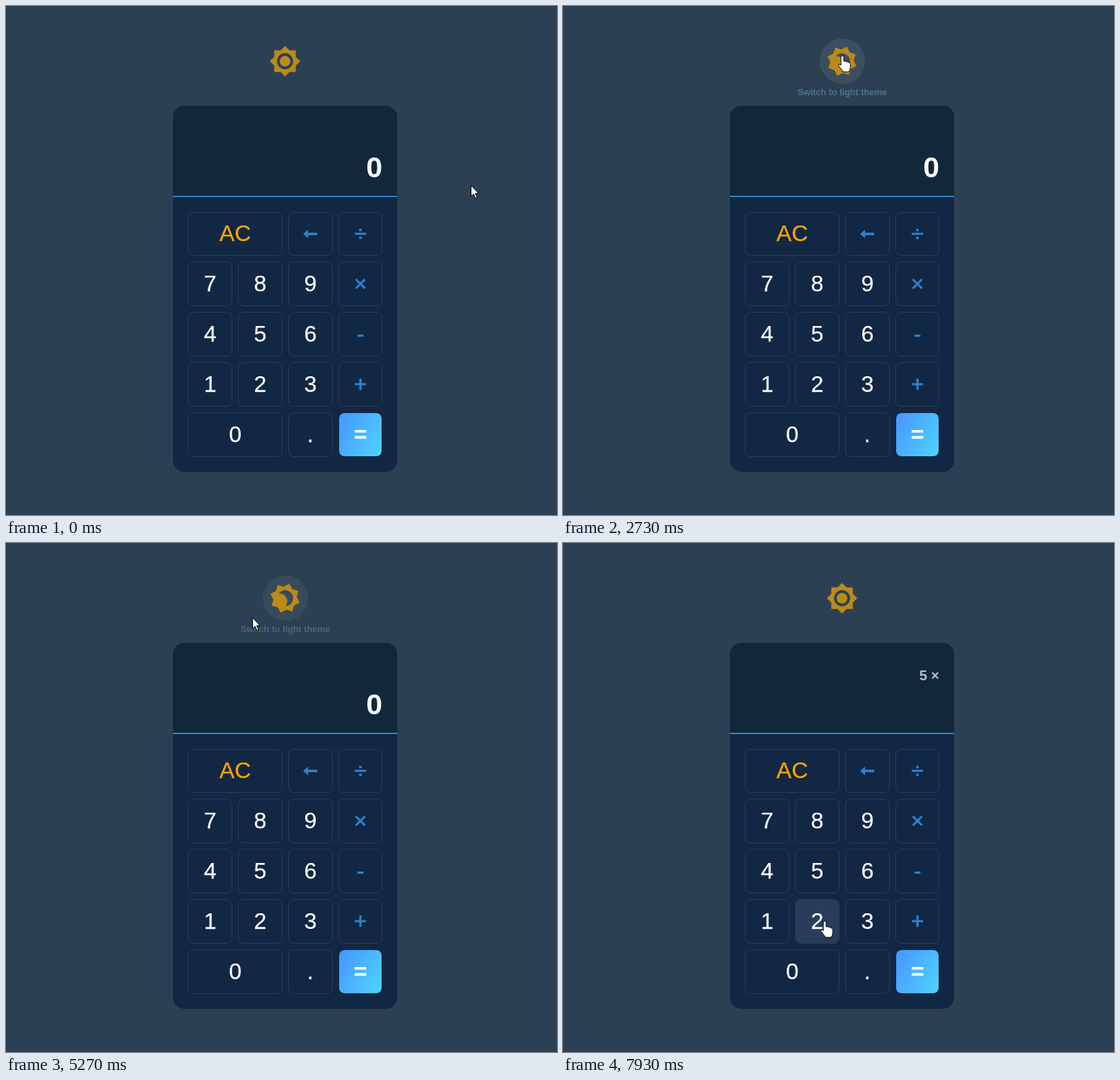
An HTML page that plays this animation: 779 by 719 pixels, repeating every 8 s.

```html
<!DOCTYPE html>
<html lang="en">
<head>
<meta charset="utf-8">
<title>Calculator theme switch</title>
<style>
html, body { margin: 0; width: 100%; height: 100%; overflow: hidden; }
#stage {
  --bg: #2c4054; --body: #112743; --screen: #11283b; --line: #3182ce;
  --edge: #2a3e52; --text: #fff; --halo: #3d4f5e; --icon: #bb8a18; --eq: #112743;
  position: relative; width: 779px; height: 719px; overflow: hidden;
  background: var(--bg); color: var(--text);
  font-family: "Liberation Sans", Arial, sans-serif;
}
#stage.light {
  --bg: #f0f0f0; --body: #fcffff; --line: #3a78c6;
  --screen: linear-gradient(120deg, #4dd8ff, #4794ff);
  --edge: #e6eef3; --text: #222; --halo: #d9d9d9; --icon: #65a3d9; --eq: #3f8fee;
}
#stage > *, #calc > *, #screen > * { position: absolute; box-sizing: border-box; }
#calc {
  left: 236.3px; top: 141.3px; width: 316.4px; height: 516.4px;
  border-radius: 16px; overflow: hidden; background: var(--body);
}
#screen {
  left: 0; top: 0; width: 100%; height: 128.7px;
  background: var(--screen); border-bottom: 2px solid var(--line);
}
#value, #expr { right: 20.7px; font-weight: bold; white-space: pre; color: #fff; }
#value { top: 64px; font-size: 41px; line-height: 46px; }
#expr { top: 35px; font-size: 20px; line-height: 22px; color: #b3bdc5; }
.key {
  height: 62.8px; border: 1px solid var(--edge); border-radius: 8px;
  display: flex; align-items: center; justify-content: center;
  font-size: 32px; -webkit-text-stroke: .25px;
}
.op { color: #3182ce; -webkit-text-stroke: .7px; }
.ac { color: #ffa500; }
.light .ac { color: #f7a51c; }
.eq {
  color: #fff; font-weight: bold; border-color: var(--eq);
  background: linear-gradient(120deg, #4794ff, #4fd5ff) padding-box;
}
.key.hot { background: #293d5b; border-color: #293d5b; }
#halo {
  left: 362.5px; top: 46px; width: 64px; height: 64px;
  border-radius: 50%; background: var(--halo);
}
#icon { left: 371px; top: 55px; fill: var(--icon); }
#tip {
  left: 295px; top: 114px; width: 200px; text-align: center;
  font-weight: bold; font-size: 12.6px; line-height: 16px;
}
#cursor { left: 0; top: 0; overflow: visible; fill: #fff; stroke: #000; stroke-linejoin: round; }
</style>
</head>
<body>
<div id="stage">
  <div id="halo"></div>
  <svg id="icon" width="47" height="46" viewBox="-12.37 -12.1 24.74 24.2"><path id="glyph" fill-rule="evenodd"/></svg>
  <div id="tip"></div>
  <div id="calc"><div id="screen"><div id="expr"></div><div id="value"></div></div></div>
  <svg id="cursor" width="24" height="24"><path id="pointer"/></svg>
</div>
<script>
const LOOP = 8000, STEP = 200 / 3;
const $ = id => document.getElementById(id);

// two crossed squares as one outline
const star = 'M' + Array.from({ length: 16 }, (_, i) => {
  const a = i * Math.PI / 8, r = i % 2 ? 8 / Math.cos(Math.PI / 8) : 8 * Math.SQRT2;
  return `${r * Math.cos(a)} ${r * Math.sin(a)}`;
}).join('L') + 'z';
const disc = r => `M${-r} 0a${r} ${r} 0 0 1 ${2 * r} 0a${r} ${r} 0 0 1 ${-2 * r} 0z`;
const SUN = star + disc(6) + disc(4);
const MOON = star + 'M-2.5 -5.45A6 6 0 0 1 -2.5 5.45A6 6 0 1 0 -2.5 -5.45z';
const ARROW = 'M.5 .5v15.5l3.6-3.4 2.6 6 2.3-1-2.6-5.8h4.8z';
const HAND = 'M-2 2a2 2 0 0 1 4 0v6h1q3-1 3 1 3-1 3 1 2.3 0 2.3 1.5v5q0 3.5-2 6.5h-8.5q-1.5-3-4.5-6.5-2.5-3-1.5-4 1.5-1 3.2 1.2z';
const BACK = '<svg width="20" height="12" fill="#3182ce"><path d="M0 6L7 0V4.3H20V7.7H7V12z"/></svg>';

const toggles = [1325, 2665, 3995, 5195];

// pointer moves: start, end, x, y
const home = [657, 253];
const moves = [
  [0, 270, 546, 141], [400, 1130, 390, 83], [1330, 2400, 395, 70], [3300, 3800, 395, 74],
  [4000, 4867, 390, 81], [5200, 5800, 188, 197], [6000, 6133, 345, 440], [6133, 6200, 396, 458],
  [6200, 6400, 372, 463], [6667, 6933, 432, 566], [6933, 7333, 512, 398],
  [7530, 7733, 467, 442], [7733, 7933, 370, 534]
];

const clamp = x => Math.min(1, Math.max(0, x));
const mix = (a, b, p) => a + (b - a) * p;
const easeOut = p => 1 - (1 - p) ** 2;

function pointerAt(t) {
  return moves.reduce(([px, py], [from, to, x, y]) => {
    const p = easeOut(clamp((t - from) / (to - from)));
    return [mix(px, x, p), mix(py, y, p)];
  }, home);
}

// cubic-bezier(.25, .1, .25, 1)
function ease(x) {
  const bez = (s, a, b) => 3 * (1 - s) * s * ((1 - s) * a + s * b) + s ** 3;
  let lo = 0, hi = 1;
  for (let i = 0; i < 18; i++) {
    const mid = (lo + hi) / 2;
    if (bez(mid, .25, .25) < x) lo = mid; else hi = mid;
  }
  return bez(lo, .1, 1);
}

const keys = [], PITCH = 70.8, SIZE = 62.8;
function addKey(label, col, row, kind = '', span = 1) {
  const x = 21 + col * PITCH, y = 149.3 + row * PITCH, w = SIZE + (span - 1) * PITCH;
  const el = document.createElement('div');
  el.className = 'key ' + kind;
  el.style.cssText = `left:${x}px;top:${y}px;width:${w}px`;
  el.innerHTML = label;
  $('calc').append(el);
  const has = ([px, py]) => {
    const dx = px - 236.3 - x, dy = py - 141.3 - y;
    return dx > 0 && dx < w && dy > 0 && dy < SIZE;
  };
  keys.push({ el, has });
}
addKey('AC', 0, 0, 'ac', 2);
addKey(BACK, 2, 0, 'op');
['789', '456', '123'].forEach((digits, r) =>
  [...digits].forEach((d, c) => addKey(d, c, r + 1)));
[...'÷×-+'].forEach((op, r) => addKey(op, 3, r, 'op'));
addKey('0', 0, 4, '', 2);
addKey('.', 2, 4);
addKey('=', 3, 4, 'eq');

const onSwitch = t => {
  const [x, y] = pointerAt(t);
  return Math.hypot(x - 394.5, y - 78) < 32;
};

function render(t) {
  const count = toggles.filter(s => s <= t).length;
  const light = count % 2 === 1;
  const age = count ? t - toggles[count - 1] : LOOP;
  $('stage').className = light ? 'light' : '';

  const turn = ease(clamp(age / 800));
  $('icon').style.transform = `rotate(${(light ? 360 : -360) * turn}deg)`;
  $('glyph').setAttribute('d', light === turn > .5 ? MOON : SUN);

  // hover fades over four steps, the label colour follows the theme
  let glow = 0;
  for (let i = 0; i < 4; i++) glow += onSwitch(t - i * STEP) / 4;
  const fade = ease(clamp(age / 420));
  const blue = 100 * (light ? fade : 1 - fade);
  $('halo').style.opacity = glow;
  $('tip').style.opacity = .7 * glow;
  $('tip').style.color = `color-mix(in srgb, #3182ce ${blue}%, #ffa500)`;
  $('tip').textContent = `Switch to ${light ? 'dark' : 'light'} theme`;

  const spot = pointerAt(t), last = pointerAt(t - STEP);
  for (const k of keys) k.el.classList.toggle('hot', k.has(last));
  const hand = onSwitch(t) || keys.some(k => k.has(spot));
  $('pointer').setAttribute('d', hand ? HAND : ARROW);
  $('cursor').style.transform = `translate(${spot.map(v => Math.round(v) + 'px')})`;

  $('value').textContent = t < 6590 ? '0' : t < 7390 ? '5' : '';
  $('expr').textContent = t < 7390 ? '' : '5 ×';
}

const start = performance.now();
function tick() {
  const t = (performance.now() - start) % LOOP;
  // the picture advances at 15 steps per second
  render(Math.min(LOOP / STEP - 1, Math.floor((t + 5) / STEP)) * STEP);
  requestAnimationFrame(tick);
}
tick();
</script>
</body>
</html>
```
